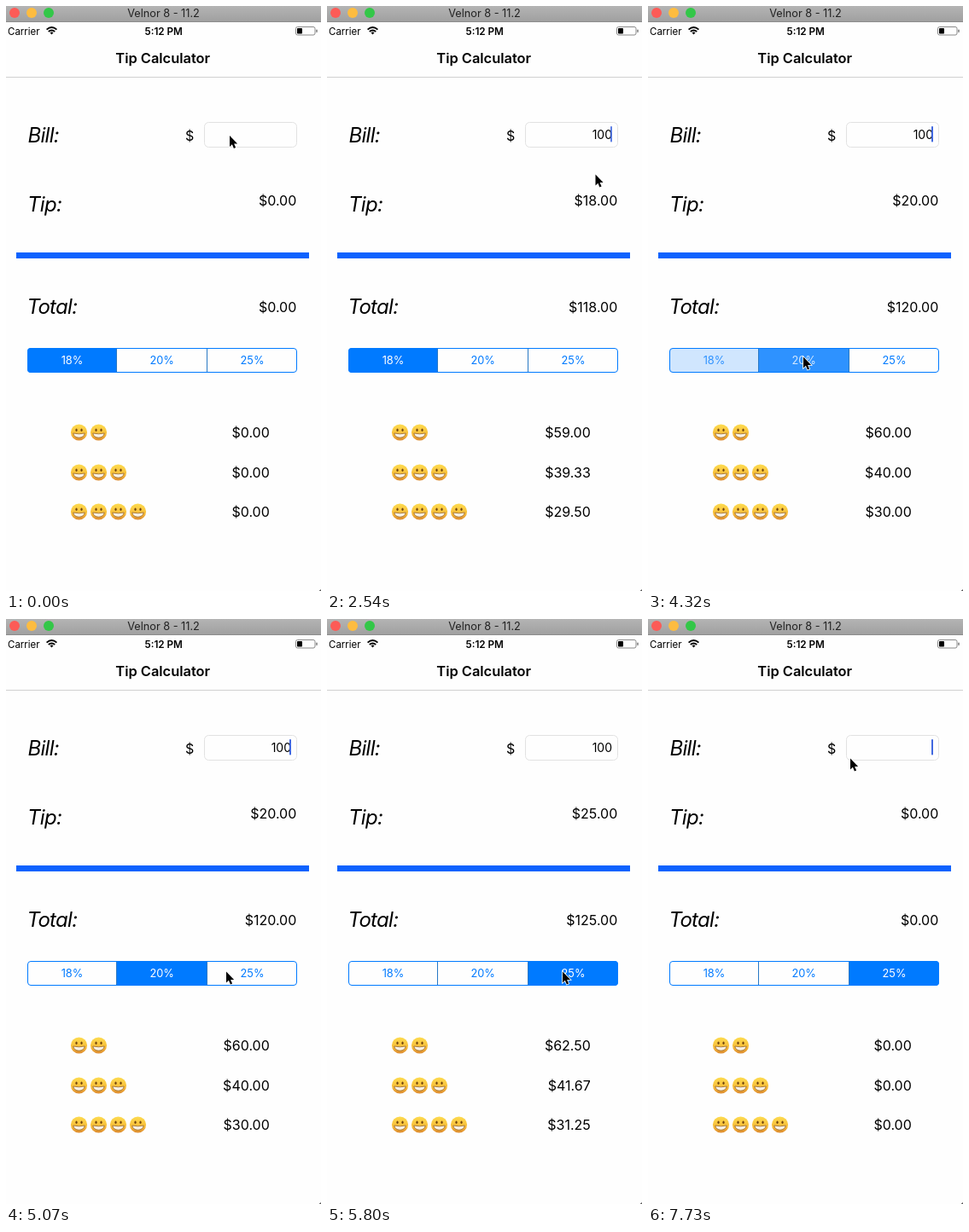
Animation, 369 px wide and 686 px high, one loop 8 s. Source, as an HTML page:

```html
<!DOCTYPE html>
<html lang="en">
<head>
<meta charset="utf-8">
<title>Tip Calculator</title>
<style>
  html, body { margin: 0; width: 100%; height: 100%; overflow: hidden; background: #fefefe; }
  svg { display: block; font-family: Inter, Roboto, sans-serif; }
  .label { font-size: 24px; font-style: italic; letter-spacing: -.03em; }
  .money { font-size: 16px; text-anchor: end; }
  .middle { text-anchor: middle; }
</style>
</head>
<body>
<svg width="369" height="686" viewBox="0 0 369 686">
  <defs>
    <linearGradient id="chrome" x2="0" y2="1">
      <stop stop-color="#b4b4b4"/><stop offset="1" stop-color="#a0a0a0"/>
    </linearGradient>
    <linearGradient id="skin" x2="0" y2="1">
      <stop stop-color="#fddc50"/><stop offset=".6" stop-color="#f7bd38"/><stop offset="1" stop-color="#dc8a30"/>
    </linearGradient>
    <clipPath id="pill"><rect x="25" y="401" width="316" height="29" rx="4"/></clipPath>
    <g id="face">
      <circle r="9.6" fill="url(#skin)"/>
      <ellipse cx="-3" cy="-2.8" rx="1.1" ry="1.7" fill="#70430f"/>
      <ellipse cx="3" cy="-2.8" rx="1.1" ry="1.7" fill="#70430f"/>
      <path d="M-6.8 1Q0 2.6 6.8 1Q5.6 6.2 0 6.2T-6.8 1Z" fill="#f8f2e6" stroke="#99682a" stroke-width=".8"/>
    </g>
  </defs>

  <rect width="369" height="686" fill="#fefefe"/>
  <rect width="369" height="18" fill="url(#chrome)"/>
  <rect y="18" width="369" height="1" fill="#8c8c8c"/>
  <circle cx="10" cy="8" r="6" fill="#fc5b57"/>
  <circle cx="30" cy="8" r="6" fill="#fdbc40"/>
  <circle cx="50" cy="8" r="6" fill="#33c748"/>
  <text class="middle" x="184.5" y="13" font-size="12.7" fill="#222">Velnor 8 - 11.2</text>

  <text x="2" y="33.5" font-size="11.5">Carrier</text>
  <g fill="none" stroke="#000" stroke-width="1.9">
    <path d="M47.6 27.6Q53.5 22.4 59.4 27.6M49.8 30Q53.5 26.8 57.2 30"/>
    <path d="M51.5 31.2Q53.5 29.6 55.5 31.2L53.5 33.4Z" fill="#000" stroke="none"/>
  </g>
  <text class="middle" x="184.7" y="33.5" font-size="11.7" font-weight="600">5:12 PM</text>
  <rect x="339.5" y="24.5" width="22.5" height="9.5" rx="2" fill="none" stroke="#8a8a8a"/>
  <rect x="341" y="26" width="6" height="6.5" rx=".8"/>
  <rect x="363.3" y="27.5" width="1.4" height="3.6" rx=".7" fill="#777"/>
  <text class="middle" x="183.7" y="67" font-size="16.4" font-weight="600">Tip Calculator</text>
  <rect y="83" width="369" height="1" fill="#d0d0d0"/>

  <text class="label" x="25.5" y="160">Bill:</text>
  <text class="label" x="25" y="241">Tip:</text>
  <text class="label" x="24.5" y="361">Total:</text>
  <text x="210" y="157.5" font-size="16">$</text>
  <rect x="232.5" y="136.5" width="108" height="29" rx="5" fill="#fefefe" stroke="#e2e2e2"/>
  <text id="bill" x="334" y="156" font-size="14" text-anchor="end"></text>
  <rect id="caret" x="332" y="141" width="2" height="18.5" rx=".8" fill="#4168df"/>
  <rect x="12" y="289" width="343" height="7" fill="#0d62fe"/>

  <g id="segments" clip-path="url(#pill)"></g>
  <path d="M129.5 401V430M235.5 401V430" stroke="#2878c4"/>
  <rect x="25.5" y="401.5" width="315" height="28" rx="3.5" fill="none" stroke="#007aff"/>
  <g id="segmentLabels" font-size="12.8" class="middle"></g>

  <g id="faces"></g>
  <g id="amounts" class="money"></g>
  <path d="M369 684V686H366.5Z" fill="#555"/>
  <path id="cursor" d="M0 0V13L2.9 10.3L4.9 15L7.1 14.1L5.1 9.5H9.1Z" stroke="#fff" stroke-width="1.6" paint-order="stroke"/>
</svg>
<script>
const LOOP = 8000, TICK = 148.7, BLINK = 6.75;
const $ = id => document.getElementById(id);

function add(parent, tag, attrs, text = '') {
  const node = document.createElementNS('http://www.w3.org/2000/svg', tag);
  for (const key in attrs) node.setAttribute(key, attrs[key]);
  node.textContent = text;
  return $(parent).appendChild(node);
}

const edges = [25, 129.5, 235.5, 341];
const rates = [18, 20, 25];
const segments = rates.map((rate, i) => ({
  fill: add('segments', 'rect', { x: edges[i], y: 401, width: edges[i + 1] - edges[i], height: 29, fill: '#007aff' }),
  label: add('segmentLabels', 'text', { x: [77.5, 182.7, 288.5][i], y: 420 }, rate + '%')
}));

const amounts = [[340.3, 233.5], [340.3, 358.5], [308.8, 505.5], [308.8, 552.5], [308.8, 598.5]]
  .map(([x, y]) => add('amounts', 'text', { x, y }));

[500, 547, 593].forEach((y, row) => {
  for (let i = 0; i < row + 2; i++) add('faces', 'use', { href: '#face', x: 85.5 + 23 * i, y });
});

// Times are in ticks: [tick, value]
const bills = [[0, 0], [11, 1], [12, 10], [14, 100], [49, 10], [50, 1], [52, 0]];
// [start, end, from, to]
const moves = [
  [2, 7, [262, 152], [314.5, 197.5]],
  [19, 25, [314.5, 197.5], [182, 411.5]],
  [29, 34, [182, 411.5], [258, 413.5]],
  [34, 36, [258, 413.5], [276, 413.5]],
  [40, 45, [276, 413.5], [237, 163.5]]
];

const latest = (list, tick) => list.filter(item => item[0] <= tick).pop();

function cursorAt(tick) {
  const [start, end, from, to] = latest(moves, tick) || moves[0];
  const p = Math.min(1, Math.max(0, (tick - start) / (end - start)));
  const eased = p * p * (3 - 2 * p);
  return from.map((v, i) => v + (to[i] - v) * eased);
}

function caretAt(tick) {
  if (tick < 2) return 0;
  if (tick < 6 || (tick > 9 && tick < 17) || tick > 47) return 1;
  const phase = (tick - (tick < 17 ? 7 : 18) + BLINK) % BLINK;
  if (phase < 2) return 0;
  if (phase < 2.2) return .5;
  return phase < 5.7 ? 1 : 1 - (phase - 5.5) * .6;
}

// Share of a segment change that began with a press at the given tick
const pressed = (tick, press) => tick < press ? 0 : [.15, .4, .82][tick - press] ?? 1;

function draw(time) {
  const tick = Math.floor((time + 8) / TICK);
  const bill = latest(bills, tick)[1];
  const rate = rates[tick < 28 ? 0 : tick < 37 ? 1 : 2];
  const tip = bill * rate / 100, total = bill + tip;

  $('bill').textContent = bill || '';
  $('caret').setAttribute('opacity', caretAt(tick));
  $('cursor').setAttribute('transform', `translate(${cursorAt(tick)})`);
  [tip, total, total / 2, total / 3, total / 4].forEach((value, i) => {
    amounts[i].textContent = '$' + value.toFixed(2);
  });

  const second = pressed(tick, 27), third = pressed(tick, 36);
  [1 - second, second - third, third].forEach((weight, i) => {
    segments[i].fill.setAttribute('opacity', weight);
    segments[i].label.setAttribute('fill', `rgb(${255 * weight},${122 + 133 * weight},255)`);
  });
}

function frame() {
  draw(performance.now() % LOOP);
  requestAnimationFrame(frame);
}
frame();
</script>
</body>
</html>
```
